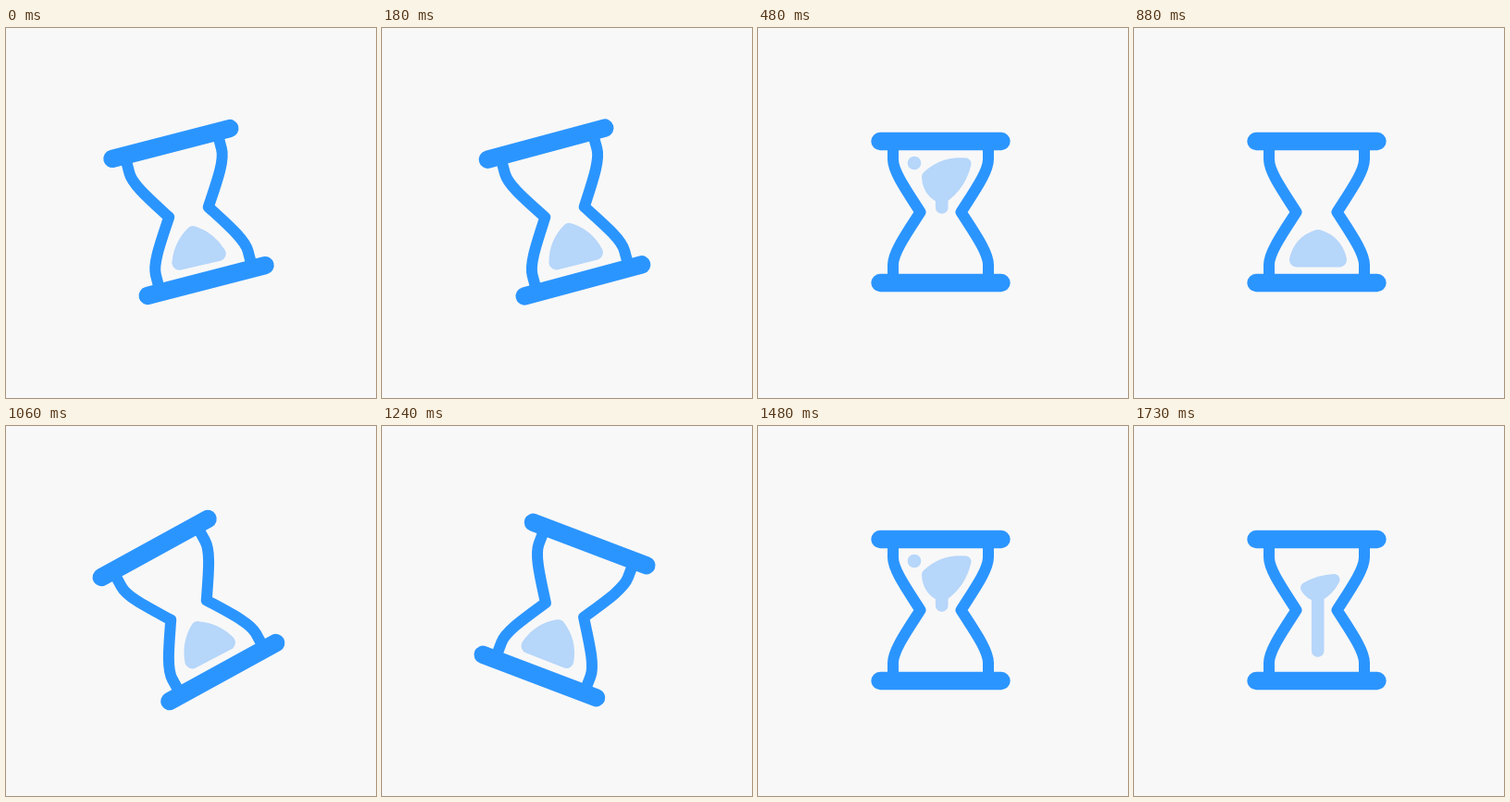
Animation, 400 px wide and 400 px high, one loop 1.76 s. Source, as an HTML page:

```html
<!DOCTYPE html>
<html lang="en">
<head>
<meta charset="utf-8">
<title>Hourglass</title>
<style>
  html, body { margin: 0; width: 100%; height: 100%; overflow: hidden; background: #f8f8f8; }
  svg { display: block; width: 100vw; height: 100vh; }
  .glass { fill: none; stroke: #2b95ff; stroke-width: 12; stroke-linejoin: round; }
  .bar { stroke-width: 19.4; stroke-linecap: round; }
  .sand { fill: #b6d6fa; stroke: #b6d6fa; stroke-linejoin: round; stroke-linecap: round; }
  #stream { stroke-width: 13.6; }
  #dot { stroke: none; }
</style>
</head>
<body>
<svg viewBox="0 0 400 400">
  <g transform="translate(197.5 199)">
    <g id="top" class="sand"><path id="body"/><circle id="dot"/></g>
    <path id="pile" class="sand"/>
    <line id="stream" class="sand" x1="1.2" x2="1.2"/>
    <g id="glass" class="glass">
      <path id="side" d="M-51.5-72V-57C-51.5-44-37.5-24-22 0C-37.5 24-51.5 44-51.5 57V72"/>
      <use href="#side" transform="scale(-1 1)"/>
      <path class="bar" d="M-65.5-76.5H65.5M-65.5 76.5H65.5"/>
    </g>
  </g>
</svg>
<script>
const LOOP = 1760, CYCLE = 1000, STEP = 30;
const TURN = 75, LANDED = 483, POUR = 740, DRAINED = 830, LIFT = 900;
const BACK = -29;

// Sand is a soft triangle: left, tip and right corners, then
// corner radius, bulge of the sides and bulge of the base.
const heap = { t: -120, v: [-21.5, 51.5, 1.5, 27, 24.5, 51.5, 8, 9.5, 0] };
const lean = { t: 0, v: [-23.5, 50.5, -1, 23.5, 20, 51.5, 8, 6.2, 0] };
const tall = { t: 300, v: [-22.5, 50, 0, 18.5, 21.5, 50.5, 8, 8.5, 0] };
const slip = { t: 480, v: [-27, 52.5, -1.5, 15, 14.5, 38.5, 6, 9, 10] };
const thin = { t: 730, v: [-19, 33, -1.5, 15, 11.5, 24, 6, 4, 4] };
const gone = { t: DRAINED, v: thin.v.map(n => n * 0.15) };
const poses = [heap, lean, tall, slip, thin, gone];

const $ = id => document.getElementById(id);
const set = (id, attrs) => {
  for (const name in attrs) $(id).setAttribute(name, attrs[name]);
};
const show = (id, on) => { $(id).style.display = on ? '' : 'none'; };
const mix = (a, b, k) => a + (b - a) * k;
const span = (t, from, to) => Math.min(1, Math.max(0, (t - from) / (to - from)));

// Same curve as cubic-bezier(.7, 0, .3, 1).
function ease(x) {
  let lo = 0, hi = 1;
  for (let i = 0; i < 24; i++) {
    const u = (lo + hi) / 2, v = 1 - u;
    if (2.1 * u * v * v + 0.9 * u * u * v + u * u * u < x) lo = u; else hi = u;
  }
  return lo * lo * (3 - 2 * lo);
}

function bulged(x1, y1, x2, y2, bulge) {
  const dx = x2 - x1, dy = y2 - y1, k = bulge / Math.hypot(dx, dy);
  return `Q${(x1 + x2) / 2 + dy * k} ${(y1 + y2) / 2 - dx * k} ${x2} ${y2}`;
}

function drawSand(id, t) {
  const next = poses.find((pose, i) => i && t <= pose.t) || gone;
  const prev = poses[poses.indexOf(next) - 1];
  const k = span(t, prev.t, next.t);
  const [lx, ly, tx, ty, rx, ry, r, side, base] = prev.v.map((n, i) => mix(n, next.v[i], k));
  set(id, {
    d: `M${lx} ${ly}` + bulged(lx, ly, tx, ty, side) +
       bulged(tx, ty, rx, ry, side) + bulged(rx, ry, lx, ly, base) + 'Z',
    'stroke-width': 2 * r
  });
}

// Swing back a little, then over; upside down until the next lift.
function angleAt(p) {
  const q = p >= LIFT ? p - CYCLE : p;
  return q < TURN
    ? BACK * ease(span(q, -TURN, TURN))
    : mix(BACK, 180, ease(span(q, TURN, LANDED)));
}

function draw(ms) {
  // Even ticks, with one slightly longer rest as the glass lands.
  const raw = ms % LOOP % CYCLE, rest = raw < 520 ? 0 : 10;
  const tick = Math.floor((raw - rest) / STEP);
  const p = (rest ? tick : Math.min(16, tick)) * STEP + rest;
  const angle = angleAt(p);
  const rotate = `rotate(${angle})`;
  set('glass', { transform: rotate });

  show('top', p < DRAINED);
  set('top', { transform: rotate });
  drawSand('body', p);
  const grow = span(p, 300, 470), fade = span(p, 490, 620);
  set('dot', {
    cx: mix(mix(23, 28.5, grow), 23, fade),
    cy: mix(53, 42, fade),
    r: 7.3 * grow * (1 - fade)
  });

  show('stream', p >= 450 && p < 870);
  const end = Math.min(51, mix(-5, 44, (p - 480) / 250));
  set('stream', { y1: Math.min(end - 0.1, mix(-14, 49, span(p, 780, 870))), y2: end });

  show('pile', p >= POUR);
  const k = 1 - (1 - span(p, POUR, 880)) ** 2;
  const turn = p >= LIFT ? rotate : '';
  set('pile', {
    transform: `${turn} translate(1 59.5) scale(${mix(0.25, 1, k)} ${k}) translate(-1 -59.5)`
  });
  drawSand('pile', p - CYCLE);
}

const start = performance.now();
function run() {
  draw(performance.now() - start);
  requestAnimationFrame(run);
}
run();
</script>
</body>
</html>
```
